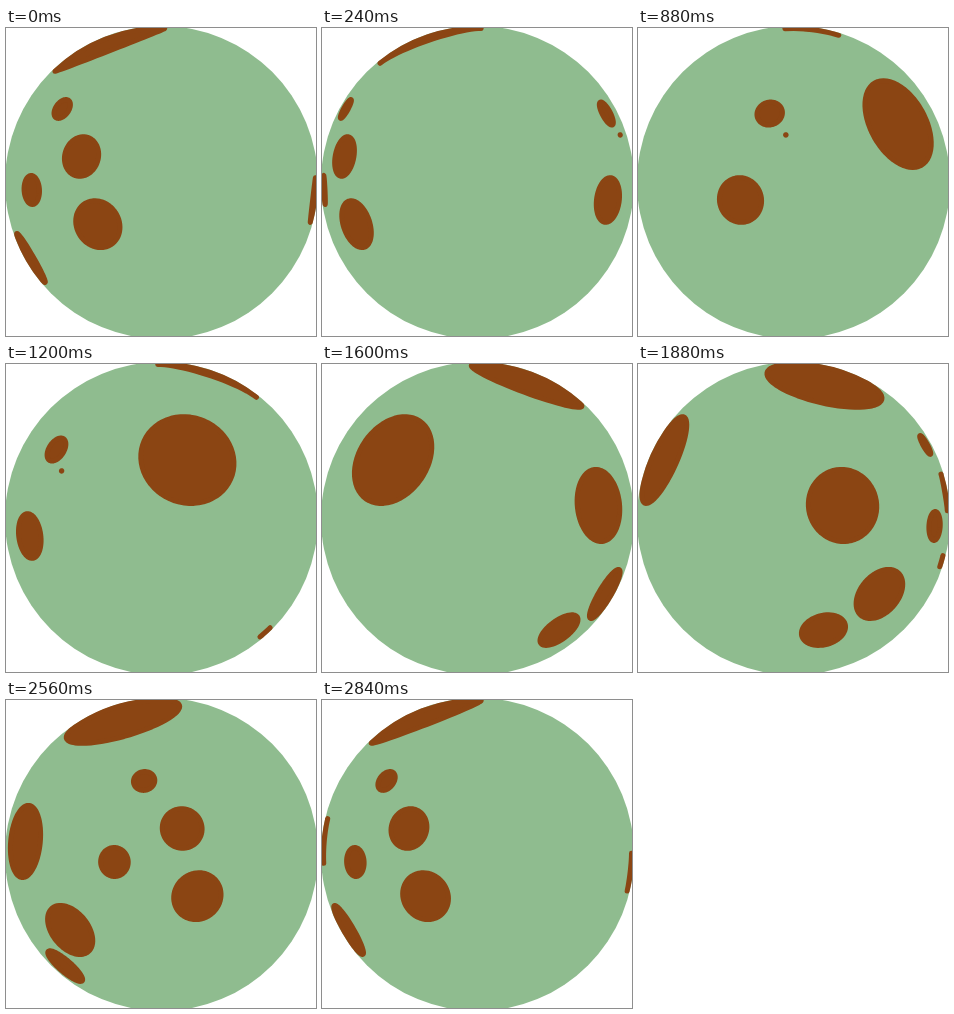
An HTML page with a canvas that plays this animation: 310 px wide and 308 px high, repeating every 2880 ms.

```html
<!DOCTYPE html>
<html lang="en">
<head>
<meta charset="utf-8">
<title>Spotted globe</title>
<style>
  html, body { margin: 0; width: 100%; height: 100%; overflow: hidden; background: #fff; }
  canvas { display: block; }
</style>
</head>
<body>
<canvas id="globe" width="310" height="308"></canvas>
<script>
const ctx = document.getElementById('globe').getContext('2d');
const CX = 155.5, CY = 154.5, RADIUS = 154, LINE = 5;
const STEP_MS = 40, STEPS = 72;
const RAD = Math.PI / 180;

// A spot is a spherical cap, given in degrees.
const spot = (lon, lat, size) => ({ lon: lon * RAD, lat: lat * RAD, size: size * RAD });

const spots = [
  spot(89.5, -6.6, 8.4),
  spot(100, 26.7, 4.8),
  spot(107, 18, 0.1),
  spot(161.1, 23.5, 17.9),
  spot(251.8, -47.1, 8.4),
  spot(254.2, 5, 13.6),
  spot(271.8, 68.7, 22.5),
  spot(275.9, -29.9, 10.6),
  spot(302.1, -2.8, 5.4),
  spot(312.6, 28.6, 4),
  spot(327.9, 9.8, 7.5),
  spot(334.2, -15.9, 9.1)
];

function drawSpot({ lon, lat, size }, turn) {
  const x = Math.cos(lat) * Math.sin(lon - turn);
  const y = -Math.sin(lat);
  const z = Math.cos(lat) * Math.cos(lon - turn);
  const r = Math.hypot(x, y);
  const cos = Math.cos(size), sin = Math.sin(size);

  // The rim faces the viewer where sin(t) > horizon.
  const horizon = -cos * z / (sin * r);
  if (horizon >= 1) return;
  const whole = horizon <= -1;
  const start = whole ? -Math.PI / 2 : Math.asin(horizon);
  const sweep = Math.PI - 2 * start;
  const count = Math.max(4, Math.ceil(sweep / (6 * RAD)));

  ctx.beginPath();
  for (let i = 0; i <= count; i++) {
    const t = start + sweep * i / count;
    const across = sin * Math.cos(t) / r;
    const along = cos - sin * Math.sin(t) * z / r;
    ctx.lineTo(CX + RADIUS * (x * along - y * across),
               CY + RADIUS * (y * along + x * across));
  }
  if (!whole) {
    const middle = Math.atan2(y, x);
    const half = Math.acos(Math.min(1, cos / r));
    ctx.arc(CX, CY, RADIUS, middle - half, middle + half);
  }
  ctx.closePath();
  ctx.fill();
  ctx.stroke();
}

function draw(now) {
  const step = Math.floor(now / STEP_MS) % STEPS;
  const turn = step / STEPS * 2 * Math.PI;
  ctx.fillStyle = '#fff';
  ctx.fillRect(0, 0, 310, 308);
  ctx.fillStyle = '#8fbc8f';
  ctx.beginPath();
  ctx.arc(CX, CY, RADIUS + LINE / 2, 0, 2 * Math.PI);
  ctx.fill();
  ctx.fillStyle = ctx.strokeStyle = '#8b4513';
  ctx.lineWidth = LINE;
  ctx.lineJoin = ctx.lineCap = 'round';
  spots.forEach(s => drawSpot(s, turn));
}

const begin = performance.now();
function tick() {
  draw(performance.now() - begin);
  requestAnimationFrame(tick);
}
tick();
</script>
</body>
</html>
```
